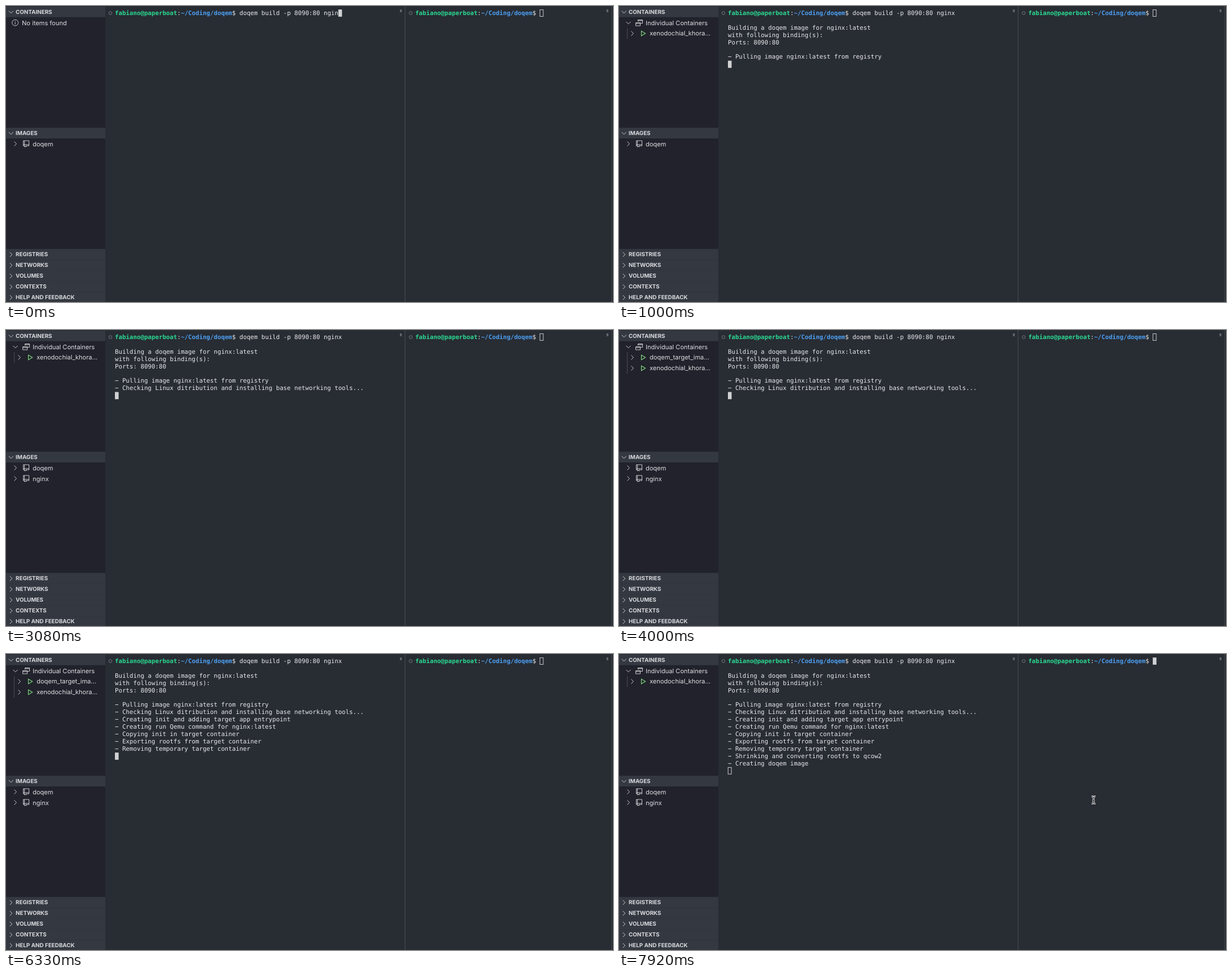
These frames come from a looping animation (1070 px wide and 523 px high, 8000 ms). An HTML page:

```html
<!DOCTYPE html>
<html lang="en">
<head>
<meta charset="utf-8">
<title>Terminal build</title>
<style>
html, body { margin: 0; height: 100%; overflow: hidden; background: #282c33; }
svg { display: block; width: 1070px; height: 523px; }
text { white-space: pre; text-rendering: geometricPrecision; }
.mono { font: 10.723px "DejaVu Sans Mono", monospace; fill: #e8eaeb; }
.row { font: 11px Inter, sans-serif; fill: #dddee2; }
.head { font: 700 9.8px Inter, sans-serif; fill: #d8dade; }
.user { font-weight: 700; fill: #2bd892; }
.path { font-weight: 700; fill: #4c9ff2; }
.icon { fill: none; stroke: #c8cacd; stroke-width: 1; }
</style>
</head>
<body>
<svg id="stage" viewBox="0 0 1070 523"></svg>
<script>
const LOOP = 8000, CELL = 6.456, LINE = 12.92, LEFT = 192, RIGHT = 721.4;
const PROMPT = 34;
const COMMAND = "doqem build -p 8090:80 ngin";

// [time, terminal row, text]
const OUTPUT = [
  [500, 2, "Building a doqem image for nginx:latest"],
  [500, 3, "with following binding(s):"],
  [500, 4, "Ports: 8090:80"],
  [750, 6, "− Pulling image nginx:latest from registry"],
  [2830, 7, "− Checking Linux ditribution and installing base networking tools..."],
  [6080, 8, "− Creating init and adding target app entrypoint"],
  [6170, 9, "− Creating run Qemu command for nginx:latest"],
  [6170, 10, "− Copying init in target container"],
  [6250, 11, "− Exporting rootfs from target container"],
  [6330, 12, "− Removing temporary target container"],
  [6420, 13, "− Shrinking and converting rootfs to qcow2"],
  [7830, 14, "− Creating doqem image"]
];

const rect = (x, y, w, h, fill) =>
  `<rect x="${x}" y="${y}" width="${w}" height="${h}" fill="${fill}"/>`;
const text = (cls, x, y, s) => `<text class="${cls}" x="${x}" y="${y}">${s}</text>`;
const icon = (d, extra = "") => `<path class="icon" d="${d}" ${extra}/>`;
const term = (x, row, s) => text("mono", x, 15.9 + row * LINE, s);

const chevron = (x, y, open) => icon(open
  ? `M${x - 4} ${y - 2}l4 4 4-4`
  : `M${x - 2} ${y - 4}l4 4-4 4`);

const header = (y, label, open) =>
  rect(0, y - 9.5, 175, 19, "#343840") +
  chevron(8.8, y + .4, open) + text("head", 17, y + 3.5, label);

const image = (y, name) => chevron(16.5, y, false) +
  icon(`M32.5 ${y + 3.5}h-2v-9h10v9h-5M32.5 ${y - 5.5}v11l1.5-1 1.5 1v-2.5M30.5 ${y + 1.5}h10`) +
  text("row", 47, y + 4.2, name);

const container = (y, name) => chevron(23.5, y, false) +
  icon(`M39.5 ${y - 4.3}l7 4.3-7 4.3z`, 'style="stroke:#7fd37f;stroke-width:1.2"') +
  text("row", 54, y + 3.9, name);

const prompt = x =>
  `<circle class="icon" cx="${x - 8}" cy="12.6" r="2.7" style="stroke:#767a80"/>` +
  term(x, 0, '<tspan class="user">fabiano@paperboat</tspan>:' +
    '<tspan class="path">~/Coding/doqem</tspan>$');

function cursor(x, row, col, focused) {
  const cx = x + col * CELL, cy = 6.2 + row * LINE;
  return focused ? rect(cx, cy, 6.5, 12.7, "#cfd1d3")
    : `<rect class="icon" x="${cx + .3}" y="${cy + .4}" width="5.8" height="11.8"/>`;
}

function pointer(x, y) {
  const d = `M${x - 3.5} ${y - 6.5}q3.5 0 3.5 3 0-3 3.5-3M${x} ${y - 4}v8` +
    `M${x - 3.5} ${y + 6.5}q3.5 0 3.5-3 0 3 3.5 3M${x - 2} ${y + 1.5}h4`;
  return icon(d, 'style="stroke:#f2f2f2;stroke-width:2.8"') +
    icon(d, 'style="stroke:#15171a"');
}

function sidebar(t) {
  let s = rect(0, 0, 175, 523, "#21222b") + header(10.3, "CONTAINERS", true);
  if (t < 920) {
    s += '<circle class="icon" cx="16.2" cy="29.5" r="5.4"/>' +
      icon("M16.2 28.5v4M16.2 26.2v1.2") + text("row", 28, 33.7, "No items found");
  } else {
    s += chevron(16.5, 29.8, true) +
      icon("M33.5 27.5v-3h8v6h-4M33.5 26h8M29.5 29.5h8v5.5h-8zM29.5 31h8") +
      text("row", 47, 33.7, "Individual Containers");
    if (t >= 1000) {
      const names = ["xenodochial_khora..."];
      if (t >= 4000 && t < 6670) names.unshift("doqem_target_ima...");
      s += rect(14, 39, 1, 19 * names.length, "#4b4d56");
      names.forEach((name, i) => s += container(48.5 + 19 * i, name));
    }
  }
  s += header(224.5, "IMAGES", true) + image(243.5, "doqem");
  if (t >= 3000) s += image(262.5, "nginx");
  ["REGISTRIES", "NETWORKS", "VOLUMES", "CONTEXTS", "HELP AND FEEDBACK"]
    .forEach((label, i) => s += header(438.7 + 19 * i, label, false));
  return s;
}

function terminals(t) {
  const rightFocus = t >= 7670;
  const command = COMMAND + (t >= 80 ? "x" : "");
  let row = t < 160 ? 0 : 1;
  let s = rect(175, 0, 895, 523, "#282c33") +
    rect(703, 0, 1, 523, "#484c52") + rect(1067, 0, 1, 523, "#40464b") +
    rect(694.5, 6, 3, 5, "#686c71") + rect(1058.7, 6, 3, 5, "#686c71") +
    prompt(LEFT) + term(LEFT + PROMPT * CELL, 0, command) + prompt(RIGHT);
  for (const [time, line, label] of OUTPUT) {
    if (t < time) break;
    s += term(LEFT, line, label);
    row = line + 1;
  }
  s += cursor(LEFT, row, row ? 0 : PROMPT + command.length, !rightFocus) +
    cursor(RIGHT, 0, PROMPT, rightFocus);
  return rightFocus ? s + pointer(836.5, 258) : s;
}

const stage = document.getElementById("stage");
const start = performance.now();
let shown = "";
function frame() {
  const t = (performance.now() - start) % LOOP;
  const next = terminals(t) + sidebar(t);
  if (next !== shown) stage.innerHTML = shown = next;
  requestAnimationFrame(frame);
}
frame();
</script>
</body>
</html>
```
